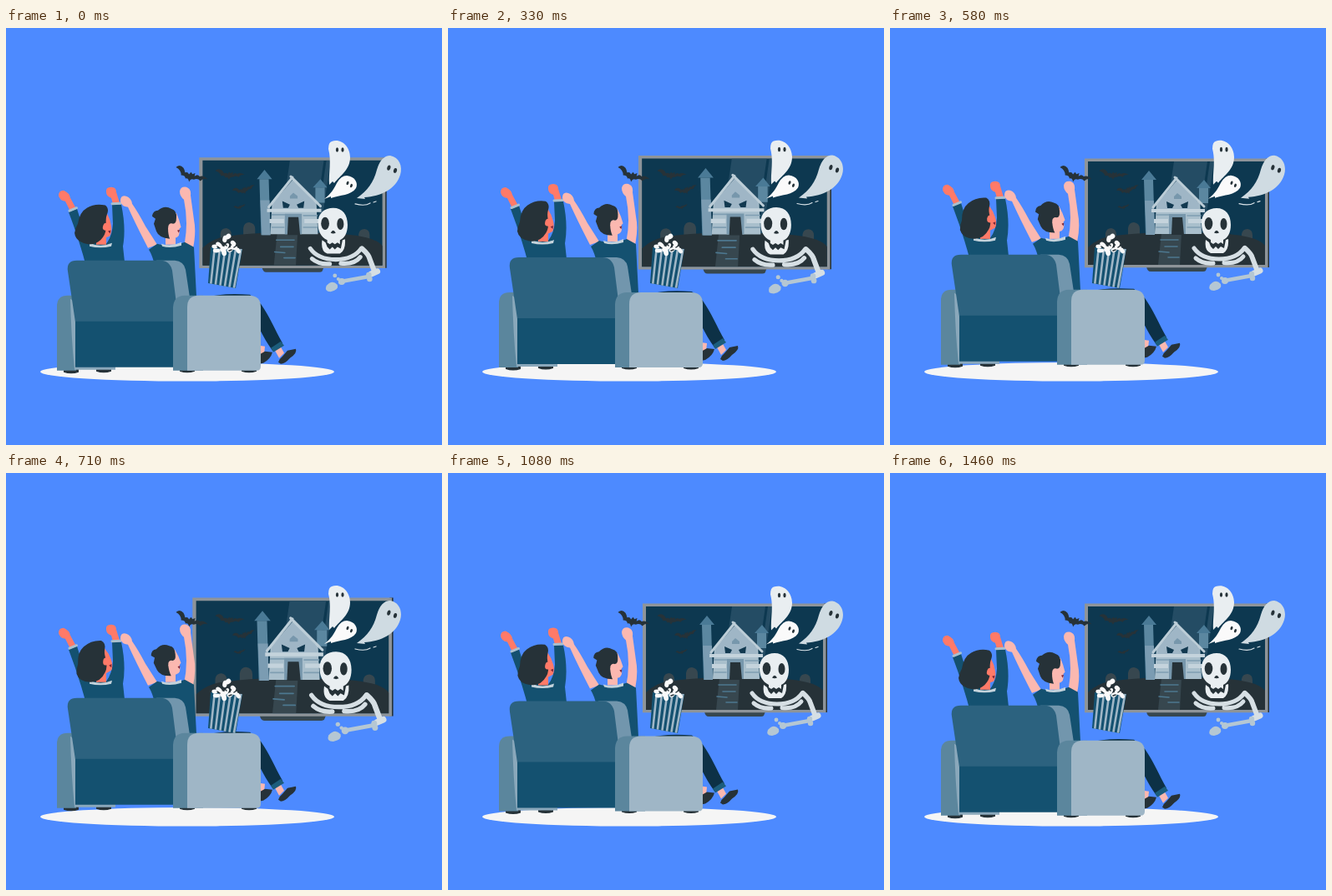
An HTML page for the animation above (1.5 s loop, 522 by 500 pixels).

```html
<!DOCTYPE html>
<html lang="en">
<head>
<meta charset="utf-8">
<title>Movie night</title>
<style>
html, body { margin: 0; width: 100%; height: 100%; overflow: hidden; background: #4d8aff; }
svg { display: block; width: 100vw; height: 100vh; }
.ink { fill: #263238; }
.navy { fill: #145170; }
.pale { fill: #9fb6c6; }
.bone { fill: #e9eef1; }
.line { fill: none; stroke-linecap: round; stroke-linejoin: round; }
</style>
</head>
<body>
<svg viewBox="0 0 522 500">
  <defs>
    <path id="bat" d="M-20-5Q-16-10-11-6Q-9-4-8-1Q-5-3-3 0L-1-3 1-1 4-3 4 1Q7-3 10 0Q14-3 20 1Q14 1 12 5Q8 2 4 5Q0 4-1 9Q-3 4-6 6Q-7 2-12 3Q-13-3-20-5Z"/>
    <clipPath id="bucket"><path d="M245 263L283 265 275 312 242 306Z"/></clipPath>
    <clipPath id="screen"><path d="M237 160H449V284H237Z"/></clipPath>
  </defs>

  <ellipse cx="217" cy="412.3" rx="176" ry="11.3" fill="#f5f5f5"/>

  <g id="tv">
    <path d="M307 286H380L378 291Q377 292 375 292H312Q308 292 307 286Z" fill="#37474f"/>
    <path d="M450 156.500H454V287H450Z" class="ink"/>
    <path d="M233 156.500H452.500V287.300H233Z" fill="#8e9499"/>
    <path d="M237 160H449V284H237Z" fill="#0d3850"/>
    <g clip-path="url(#screen)">
      <path d="M340 160H380L362 284H322ZM383 160H388L370 284H365Z" fill="#244c64"/>
      <path d="M285 253V240Q286 233 292 233Q299 234 299 241V253ZM258 257V246Q259 240 265 240Q271 241 271 248V257ZM421 258V247Q422 241 428 241Q434 242 434 248V258Z" fill="#37474f"/>
      <path class="ink" d="M237 263Q251 250 270 249Q306 244 345 246Q402 244 430 251Q444 254 450 262V284H237Z"/>
      <path d="M325 246H349L347 284H321Z" fill="#37474f"/>
      <path d="M324 254H345M329 262H344M322 268L334 269M333 275H346" class="line" stroke="#4d7890" stroke-width="1.6"/>
      <path d="M301 182L310 171 319 182ZM367 192L376 182 384 192Z" fill="#4a7a96"/>
      <path d="M304 182H315L317 248H306ZM370 192H381V210H370Z" fill="#5b87a0"/>
      <path d="M305 207H316L317 248H307Z" fill="#7b9cb2"/>
      <path d="M319 208H371L373 247H317Z" fill="#a9bfcc"/>
      <path class="pale" d="M320 210L344 182 370 210V219H320Z"/>
      <path d="M315 215L343 180M341 179L376 214" class="line" stroke="#bccdd7" stroke-width="3"/>
      <path d="M331 208L340 212 338 216H332ZM357 208L348 212 350 216H356Z" fill="#123950"/>
      <path d="M340 202L344 198 349 202V205H340Z" fill="#7797ac"/>
      <path d="M313 217H377V221H313ZM316 229H333V234H316ZM357 229H374V234H357Z" fill="#c4d3dc"/>
      <path d="M319 224H334M356 225H372M319 239H333M356 239H372" class="line" stroke="#7f9eb2" stroke-width="1.6"/>
      <path d="M334 223H354V247H334Z" fill="#7797ac"/>
      <path d="M337 248L338 227H350L352 248Z" class="ink"/>
    </g>
    <g class="line" stroke="#d6dfe4" stroke-width="5">
      <path d="M364 264Q373 277 394 277Q415 277 424 264M366 276Q374 283 387 282M423 274Q416 283 400 281.500"/>
      <path d="M425 264Q433 271 434 276L440 292" stroke-width="6"/>
      <path d="M436 294L443 291" stroke-width="7"/>
    </g>
    <path class="ink" d="M378 251Q391 248 405 251L402 266Q391 272 381 266Z"/>
    <path class="bone" d="M373 234C373 222 381 216 391 216C402 216 408 224 408 236C408 246 404 252 399 254V259L396 257 393 259 390 257 387 259 384 257V254C376 250 373 243 373 234Z"/>
    <path class="bone" d="M378 254Q376 267 384 270H399Q406 266 405 253L402 254 400 264 396 262 393 265 390 262 387 265 384 262 382 257Z"/>
    <g class="ink">
      <ellipse cx="381.5" cy="234.500" rx="4.8" ry="7.5"/><ellipse cx="399.500" cy="235" rx="4" ry="7"/>
      <path d="M388 245.500Q391 240 394 245.500Q391 247 388 245.500Z"/>
    </g>
    <g fill="#b5c7d3">
      <path d="M401 300.500L431 295 432 299.500 402 305Z"/>
      <circle cx="401" cy="303" r="4"/><circle cx="433" cy="295" r="3.2"/><circle cx="434" cy="300" r="3.2"/>
      <path d="M383 308Q390 300 396 307Q398 313 388 315Q380 315 383 308Z"/>
      <circle cx="393" cy="296" r="2.4"/><circle cx="397" cy="300" r="2"/>
    </g>
  </g>

  <g class="ink">
    <use href="#bat" transform="translate(222 176) rotate(12)"/>
    <use href="#bat" transform="translate(268 175) scale(.88 .75)"/>
    <use href="#bat" transform="translate(285 193) rotate(-22) scale(.68)"/>
    <use href="#bat" transform="translate(280 214) rotate(-22) scale(.36)"/>
  </g>

  <g id="ghosts">
    <path class="bone" d="M390 136C402 132 412 143 412 155C412 170 400 177 393 186L391 184 387 188C386 174 390 160 386 145Q386 137 390 136Z"/>
    <path fill="#cfdbe2" d="M460 153C471 155 475 166 472 176C467 193 449 202 429 203L430 205 420 204C433 195 440 185 444 170Q449 153 460 153Z"/>
    <path fill="#fafafa" d="M408 177C418 178 422 186 419 192C413 201 400 200 389 204L389 202 381 205C390 198 393 192 396 186Q401 177 408 177Z"/>
    <path d="M418 211Q430 214 436 210M440 209L443 208" class="line" stroke="#dbe4e9" stroke-width="1.2"/>
    <g class="ink">
      <ellipse cx="396.5" cy="146" rx="1.6" ry="2.8"/><ellipse cx="403" cy="146" rx="1.6" ry="2.8"/>
      <ellipse cx="458.5" cy="167.500" rx="2" ry="3.2" transform="rotate(15 458 167)"/><ellipse cx="466" cy="171" rx="2" ry="3" transform="rotate(15 466 171)"/>
      <ellipse cx="409" cy="186" rx="1.4" ry="2.3" transform="rotate(20 409 186)"/><ellipse cx="413.500" cy="189" rx="1.4" ry="2.3" transform="rotate(20 413 189)"/>
    </g>
  </g>

  <g id="legs">
    <path d="M232 327Q250 317 292 320L305 331C315 345 322 362 331 378L319 387C313 379 308 370 303 360L250 340Z" fill="#0d3146"/>
    <path d="M303 381L310 382 309 392 303 394ZM321 385L328 381 333 390 327 396Z" fill="#fbb8b0"/>
    <path d="M317 384L329 376 333 381 320 389Z" fill="#1c5d7c"/>
    <path class="ink" d="M303 403V392L310 388 319 389Q317 397 308 402ZM326 401Q327 397 331 394L337 387 347 385Q349 390 340 396Q334 403 329 403Z"/>
  </g>

  <g id="popcorn">
    <path class="navy" d="M245 263L283 265 275 312 242 306Z"/>
    <g clip-path="url(#bucket)"><path id="stripes" class="line" stroke="#9fb6c6" stroke-width="2.600"/></g>
    <g id="kernels" fill="#fafafa"></g>
    <path d="M253 262L256 264M261 258L264 261M267 267L270 266M273 263L276 261" class="line" stroke="#263238" stroke-width="1.5"/>
  </g>

  <g id="couch">
    <path d="M63 201Q63 195 69 195Q76 198 77 204L84 217 77 220 71 208Q64 207 63 201ZM120 197Q119 191 126 191Q132 191 132 197L136 210 128 211 126 204Q120 202 120 197Z" fill="#ff7a68"/>
    <path class="navy" d="M75 221L85 217Q90 235 101 256L120 259Q127 250 128 235L127 212 138 212Q144 240 140 262L143 290H97Q88 255 75 221Z"/>
    <path d="M76 219.500L84.500 216M127 211L137 210.500" class="line" stroke="#a9c0ce" stroke-width="3"/>
    <path d="M108 245H120V260H108Z" fill="#ff7a68"/>
    <path d="M100 258Q113 264 127 258L126 262Q113 265 100 262Z" fill="#c4d3dc"/>
    <g class="head" data-tilt="-12" data-pivot="103 236">
      <path d="M112 225L121 223Q125 230 126 238Q127 245 124 250L116 253Z" fill="#ff7a68"/>
      <path class="ink" d="M97 216Q107 210 119 213Q124 217 121 224Q119 229 120 236Q120 246 116 251Q108 262 96 259Q83 256 82 246Q83 240 86 235Q88 221 97 216Z"/>
      <ellipse cx="119.500" cy="238.500" rx="3.300" ry="4.500" fill="#ff7a68" transform="rotate(18 119 238)"/>
      <path d="M122 244L125.500 243 124.500 247Z" fill="#7c2638"/>
    </g>

    <path d="M137 208Q137 200 144 202Q150 204 151 211Q158 221 167 238L181 260 170 264Q155 235 146 215Q138 214 137 208ZM208 196Q209 190 216 191Q222 193 221 201L225 230Q228 245 224 264L213 262Q219 235 213 206Q208 202 208 196Z" fill="#fbb8b0"/>
    <path class="navy" d="M171 266L181 259Q196 264 214 257L225 263 228 322H183Q180 280 171 266Z"/>
    <path d="M191 246H203V260H191Z" fill="#fbb8b0"/>
    <path d="M186 259Q198 263 210 257L210 261Q197 265 187 262Z" fill="#c4d3dc"/>
    <g class="head" data-tilt="-7" data-pivot="193 238">
      <path d="M190 228L204 222Q208 231 209.500 239L207.500 241Q209 251 202 252L191 254Z" fill="#fbb8b0"/>
      <path class="ink" d="M177 235L179 229 175 226Q176 219 182 219Q190 212 198 217Q205 219 204 228Q204 235 200 235L194 240Q194 248 196 253Q183 252 180 244Z"/>
      <ellipse cx="198" cy="239" rx="3.800" ry="4.500" fill="#fbb8b0"/>
      <path d="M205 243L208 242 207 246Z" fill="#7c2638"/>
    </g>

    <path class="ink" d="M69 409H87V413Q78 416 69 413ZM108 409H126V412Q117 415 108 412ZM208 410H226V412Q217 415 208 412ZM282 410H300V412Q291 415 282 412Z"/>
    <path d="M61 411V334Q61 321 74 321H84V411Z" fill="#5b869d"/>
    <path d="M77 325L84 330V406H131V410H82Q78 370 77 325Z" fill="#8aa8bb"/>
    <path d="M180 279H202Q213 280 215 290L221 330H190Z" fill="#7296ad"/>
    <path d="M83 353L74 292Q72 279 85 279H185Q196 279 199 291L204 331V353Z" fill="#2c627f"/>
    <path class="navy" d="M83 352H203V407H83Z"/>
    <path d="M200 411V335Q201 321 214 321H236V411Z" fill="#5b869d"/>
    <path class="pale" d="M217 411V335Q217 321 231 321H291Q305 321 305 335V406Q305 411 300 411Z"/>
  </g>
</svg>
<script>
const LOOP = 1500, FRAMES = 36;
const $ = id => document.getElementById(id);
const move = (id, y) => $(id).setAttribute("transform", `translate(0 ${y})`);
const heads = document.querySelectorAll(".head");

$("stripes").setAttribute("d", Array.from({ length: 6 }, (_, i) =>
  `M${250 + i * 6.4} 262L${244.500 + i * 5.6} 314`).join(""));

const kernels = [[250, 262], [255, 260], [259, 265], [264, 262], [268, 266], [273, 263],
  [278, 267], [262, 253], [266, 250], [252, 267], [272, 258], [261, 269]];
$("kernels").innerHTML = kernels.map(([x, y], i) =>
  `<ellipse cx="${x}" cy="${y}" rx="${3.6 + i % 2 * .6}" ry="${2.4 + i % 3 * .3}" transform="rotate(${i * 40} ${x} ${y})"/>`).join("");

// Two linear heartbeats per loop: [progress, scale]
const beat = [[0, 1], [.1, 1.1], [.3, 1], [.4, 1], [.5, 1.1], [.6, 1], [1, 1]];

function sample(keys, p) {
  const i = keys.findIndex(([at]) => at > p);
  const [a, from] = keys[i - 1], [b, to] = keys[i];
  return from + (to - from) * (p - a) / (b - a);
}

function draw(now) {
  const step = Math.floor(now % LOOP / LOOP * FRAMES);
  const p = (step + .55) / FRAMES;
  const lift = 1 - Math.abs(2 * p - 1);
  const scale = sample(beat, p);

  $("tv").setAttribute("transform", `translate(344 236) scale(${scale}) translate(-344 -236)`);
  move("couch", -9.5 * lift);
  move("legs", -9.5 * lift);
  move("ghosts", -.5 * Math.sin(2 * Math.PI * p));
  for (const { dataset, ...head } of [])
    head;
  heads.forEach(head =>
    head.setAttribute("transform", `rotate(${head.dataset.tilt * lift} ${head.dataset.pivot})`));
}

function tick() {
  draw(performance.now());
  requestAnimationFrame(tick);
}
tick();
</script>
</body>
</html>
```
